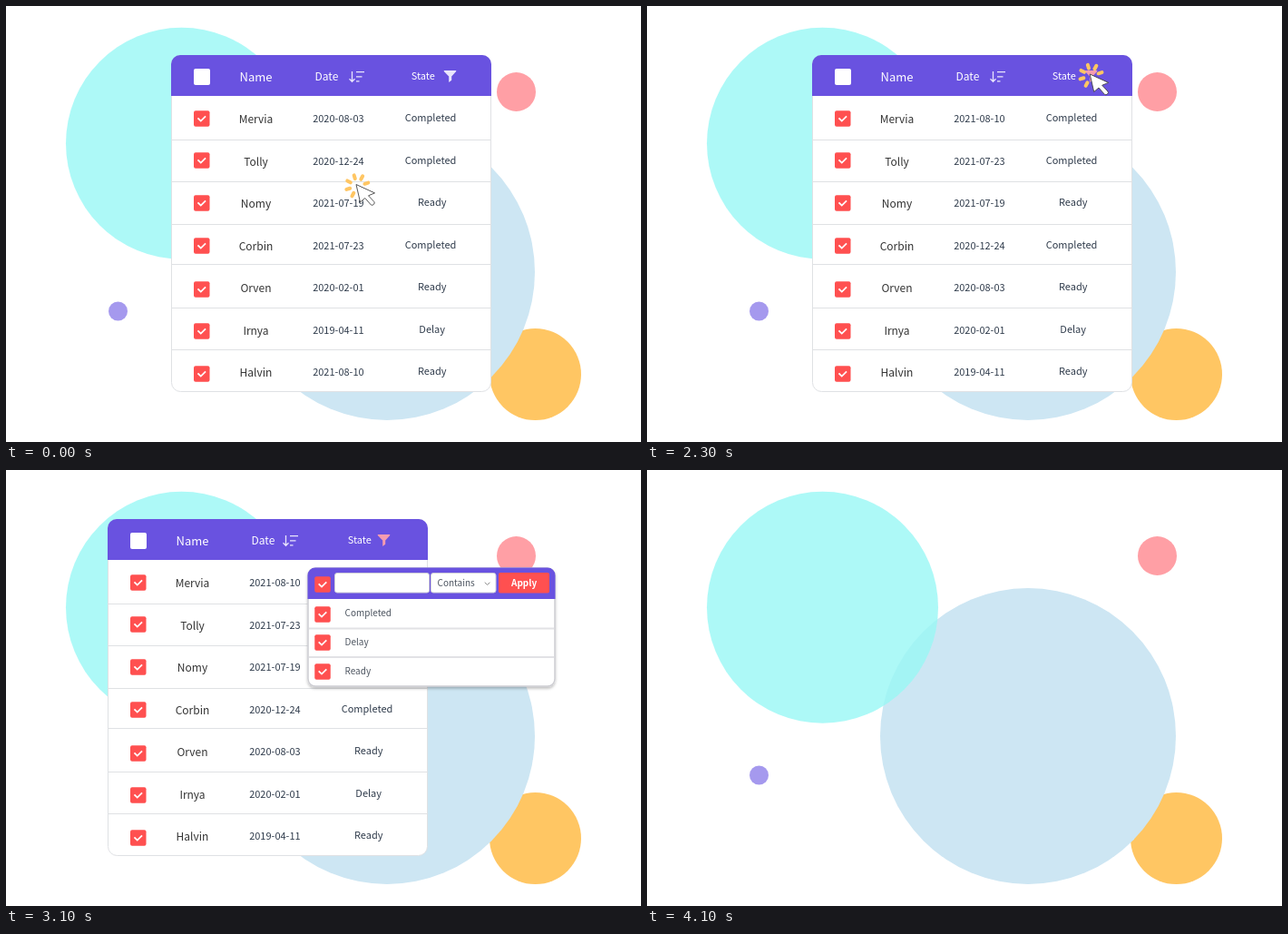
An HTML page that plays this animation: 700x480 px, repeating every 4400 ms.

```html
<!DOCTYPE html>
<html lang="en">
<head>
<meta charset="utf-8">
<title>Sort and filter a table</title>
<style>
  html, body { margin: 0; width: 100%; height: 100%; overflow: hidden; background: #fff; }
  svg { display: block; width: 700px; height: 480px; }
  text { font-family: "Noto Sans CJK SC", "Noto Sans CJK JP", "Noto Sans", sans-serif; font-size: 11px; fill: #303c4c; }
  .mid { text-anchor: middle; }
  .name { font-size: 12px; fill: #333; }
  .head { fill: #fff; font-weight: 500; }
  .small { font-size: 10px; fill: #4d5560; }
</style>
</head>
<body>
<svg viewBox="0 0 700 480">
  <defs>
    <g id="check">
      <rect x="-8.75" y="-8.75" width="17.5" height="17.5" rx="2" fill="#ff5050"/>
      <path d="M-4.3 -.6L-1 2.6L4.3 -2.6" fill="none" stroke="#fff" stroke-width="1.8"/>
    </g>
    <filter id="shadow" x="-10%" y="-10%" width="120%" height="125%">
      <feDropShadow dx="0" dy="2" stdDeviation="1.6" flood-opacity=".25"/>
    </filter>
  </defs>

  <circle cx="583.5" cy="405.5" r="50.5" fill="#ffc663"/>
  <circle cx="420" cy="293" r="163" fill="#cde6f3"/>
  <circle cx="193.5" cy="151.3" r="127.5" fill="#99f8f5" opacity=".8"/>
  <circle cx="562.5" cy="94.5" r="21.5" fill="#ff9fa5"/>
  <circle cx="123.5" cy="336" r="10.5" fill="#a599ee"/>

  <g id="table">
    <rect x="182.5" y="54.5" width="352" height="370" rx="10" fill="#fff" stroke="#dfe1e4"/>
    <path d="M182 99V64a10 10 0 0 1 10 -10H525a10 10 0 0 1 10 10V99z" fill="#6952e0"/>
    <path d="M183 147.5h351M183 193.5h351M183 240.5h351M183 284.5h351M183 332.5h351M183 378.5h351" stroke="#dfe1e4"/>
    <rect x="207" y="69" width="18" height="18" rx="2" fill="#fff"/>
    <text class="head" x="257.5" y="82.6" style="font-size:13px">Name</text>
    <text class="head" x="340.5" y="82" style="font-size:12px">Date</text>
    <text class="head" x="446.7" y="81">State</text>
    <g id="icons">
      <path id="sort" d="M381.5 72V83M378.5 80.3L381.5 83.3L384.5 80.3M386 72.7h9M386 77.8h6.5M386 82.8h3.5" fill="none" stroke-width="1.3"/>
      <path id="funnel" d="M482.8 71h13.4v1l-5 5.6v4.2l-3 2.2v-6.4l-5.4 -5.6z"/>
    </g>
    <g id="rows"></g>
    <g id="dates"></g>
  </g>

  <g id="popup">
    <rect x="333" y="108" width="272" height="130" rx="8" fill="#fff" stroke="#cdcdd2" stroke-width="1.5" filter="url(#shadow)"/>
    <path d="M332.5 142V116a8.5 8.5 0 0 1 8.5 -8.5H597a8.5 8.5 0 0 1 8.5 8.5V142z" fill="#6952e0"/>
    <path d="M334 174.5h270M334 206h270" stroke="#e2e2e5" stroke-width="2"/>
    <g fill="#fff" stroke="#cfcfd8">
      <rect x="362.5" y="113.5" width="104" height="21.5" rx="2.5"/>
      <rect x="468.5" y="113.5" width="71.5" height="21.5" rx="2.5"/>
    </g>
    <rect x="543" y="113" width="56" height="22.5" rx="2" fill="#ff5050"/>
    <path d="M527.8 123.7l2.8 2.8l2.8 -2.8" fill="none" stroke="#888"/>
    <use href="#check" x="349" y="126"/>
    <text class="small" x="475.5" y="128">Contains</text>
    <text class="small" x="557" y="128" style="fill:#fff;font-weight:700">Apply</text>
    <g id="options"></g>
  </g>

  <g id="cursor">
    <g id="sparks" fill="#ffc663"></g>
    <path d="M-.5 -1L4 18.5L9.3 14L15.8 21.4Q17.3 22.4 18.8 21Q20.4 19.5 19.3 18L13 11.3L20 8.4z" fill="#fff" stroke="#444" stroke-width=".9" stroke-linejoin="round"/>
  </g>
</svg>
<script>
const LOOP = 4400, TICK = 100;
const WHITE = '#e9e5fc', PINK = '#f59cb0';
const rowY = [124, 171, 217, 264, 310, 357, 403];
const checkY = [124, 170, 217, 264, 312, 358, 405];
const names = ['Mervia', 'Tolly', 'Nomy', 'Corbin', 'Orven', 'Irnya', 'Halvin'];
const states = ['Completed', 'Completed', 'Ready', 'Completed', 'Ready', 'Delay', 'Ready'];
const dates = ['2020-08-03', '2020-12-24', '2021-07-19', '2021-07-23', '2020-02-01', '2019-04-11', '2021-08-10'];
const sorted = [...dates].sort().reverse();

const el = id => document.getElementById(id);
const check = (x, y) => `<use href="#check" x="${x}" y="${y}"/>`;
const label = (cls, x, y, s) => `<text class="${cls}" x="${x}" y="${y}">${s}</text>`;
const move = (id, x, y) => el(id).setAttribute('transform', `translate(${x} ${y})`);
const show = (id, on) => el(id).setAttribute('visibility', on ? 'visible' : 'hidden');

// Smooth progress from 0 to 1 between two times
const ease = (t, from, to) => {
  const p = Math.min(1, Math.max(0, (t - from) / (to - from)));
  return p * p * (3 - 2 * p);
};

el('rows').innerHTML = rowY.map((y, i) =>
  check(215.75, checkY[i]) +
  label('mid name', 275.5, y + 5, names[i]) +
  label('mid', states[i] === 'Completed' ? 468 : 469.7, y + 3, states[i])).join('');
el('dates').innerHTML = rowY.map(y => label('mid', 366.4, y + 4, '')).join('');
el('options').innerHTML = ['Completed', 'Delay', 'Ready'].map((s, i) =>
  check(349, [159, 190, 222][i]) + label('small', 373.5, 161 + 32 * i, s)).join('');
el('sparks').innerHTML = [-152, -107, -62, -17, 118, 163].map(a =>
  `<rect x="6.5" y="-2" width="8" height="4" rx="2" transform="translate(.8 .8) rotate(${a})"/>`).join('');

function draw(t) {
  const shifted = t >= 2500 && t < 3800;
  move('table', shifted ? -70 : 0, 0);
  move('icons', shifted ? -3 : 0, 0);
  el('table').setAttribute('opacity', 1 - ease(t, 3800, 4100));
  el('sort').setAttribute('stroke', t >= 900 && t < 2100 ? PINK : WHITE);
  el('funnel').setAttribute('fill', t >= 2300 && t < 3800 ? PINK : WHITE);

  const list = t >= 1300 && t < 3800 ? sorted : dates;
  [...el('dates').children].forEach((d, i) => d.textContent = list[i]);
  show('dates', t < 1100 || t >= 1300);
  move('dates', t >= 1300 && t < 1600 ? 18 * (1 - ease(t, 1300, 1600)) : 0, 0);

  show('popup', t >= 2700 && t < 3600);
  move('popup', 0, 72 * (1 - ease(t, 2700, 3100)));

  show('cursor', t < 2500);
  if (t < 2100) move('cursor', 386.5, 197.5 - 119.5 * ease(t, 100, 400));
  else move('cursor', 488.7, 76);
}

function frame() {
  draw(Math.floor(performance.now() % LOOP / TICK) * TICK);
  requestAnimationFrame(frame);
}
frame();
</script>
</body>
</html>
```
